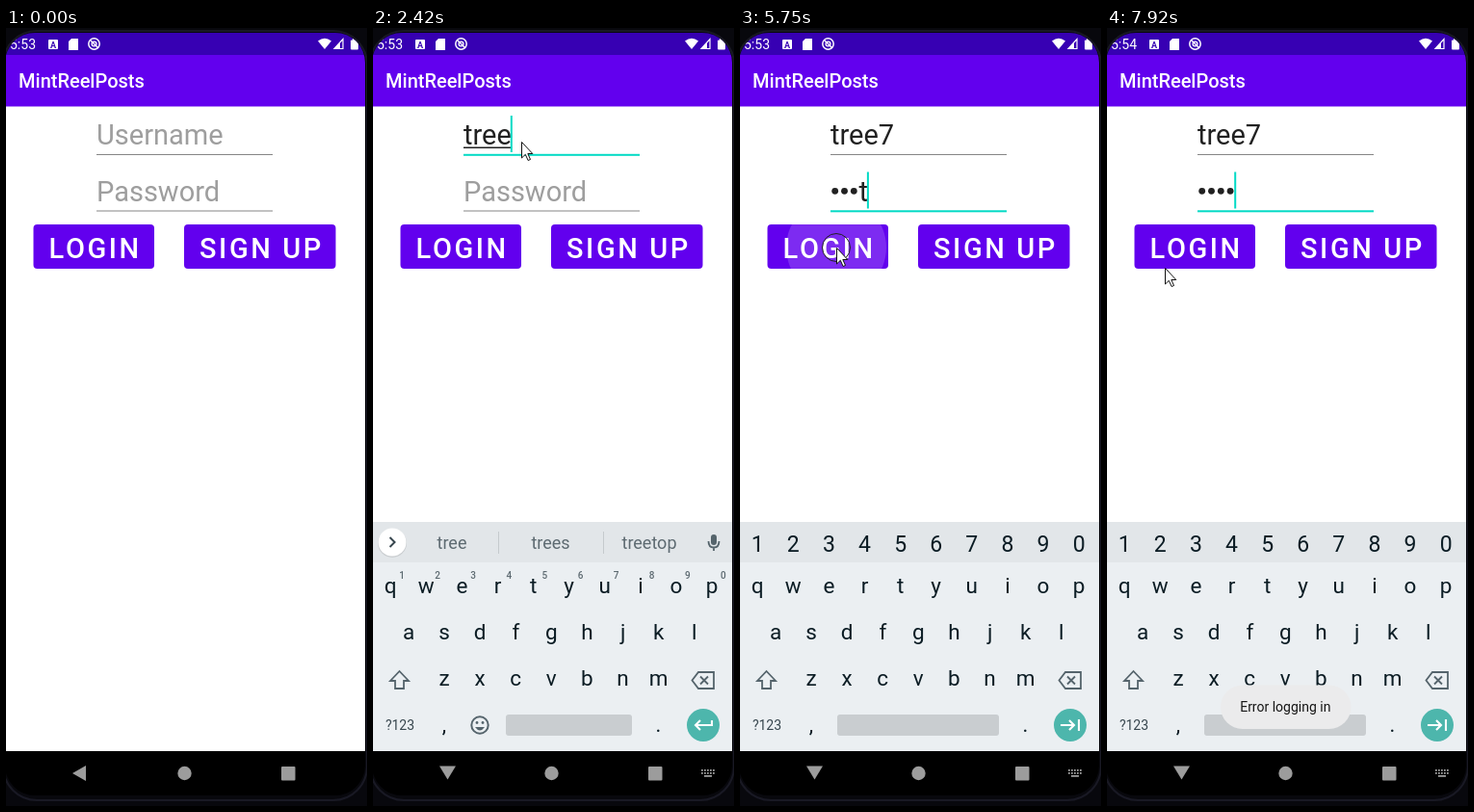
An HTML page that plays this animation: 375 by 808 pixels, repeating every 7.99 s.

```html
<!DOCTYPE html>
<html lang="en">
<head>
<meta charset="utf-8">
<title>Login screen</title>
<style>
  html, body { margin: 0; width: 100%; height: 100%; overflow: hidden; background: #08080d; }
  svg { display: block; width: 375px; height: 808px; font-family: Roboto, sans-serif; white-space: pre; }
</style>
</head>
<body>
<svg id="stage" viewBox="0 0 375 808"></svg>
<script>
const LOOP = 7990, PURPLE = '#6200ee', TEAL = '#03dac5', INK = '#0b1c24', ICON = '#55646c';
const stage = document.getElementById('stage');
const pen = document.createElement('canvas').getContext('2d');
pen.font = '29px Roboto, sans-serif';

const clamp = (v) => Math.max(0, Math.min(1, v));
const between = (t, a, b) => t >= a && t < b;
// Last value whose start time has passed; steps are [time, value].
const at = (steps, t) => steps.filter(([start]) => start <= t).pop()[1];

const rect = (x, y, w, h, fill, r = 0, extra = '') =>
  `<rect x="${x}" y="${y}" width="${w}" height="${h}" rx="${r}" fill="${fill}" ${extra}/>`;
const circle = (x, y, r, fill, extra = '') => `<circle cx="${x}" cy="${y}" r="${r}" fill="${fill}" ${extra}/>`;
const path = (d, fill, extra = '') => `<path d="${d}" fill="${fill}" ${extra}/>`;
const line = (d, color, width = 2) => path(d, 'none', `stroke="${color}" stroke-width="${width}"`);
const text = (s, x, y, size, fill, extra = '') =>
  `<text x="${x}" y="${y}" font-size="${size}" fill="${fill}" ${extra}>${s}</text>`;
const label = (s, x, y, size, fill, extra = '') => text(s, x, y, size, fill, 'text-anchor="middle" ' + extra);

const username = [[0, ''], [1950, 't'], [2080, 'tr'], [2280, 'tre'], [2350, 'tree'], [3220, 'tree7']];
const suggestions = [
  [0, null], [1950, ['the', 'to', 'this']], [2080, ['try', 'true', 'trip']],
  [2280, ['tree', 'trees', 'trend']], [2420, ['tree', 'trees', 'treetop']], [3220, ['tree7', 'tree', 'trees']],
];
const typedCount = [[0, 0], [4080, 1], [4210, 2], [4340, 3], [4560, 4]];
const caretOn = [
  [0, false], [1140, true], [2950, false], [3220, true], [5020, false], [5540, true],
  [6060, false], [6590, true], [7060, false], [7560, true],
];
const pointerPath = [
  [130, 316, 585], [270, 276, 440], [420, 205, 245], [540, 164, 140], [610, 154, 118],
  [5080, 154, 118], [5150, 167, 138], [5340, 167, 138], [5480, 130, 185], [5640, 100, 228],
  [6740, 100, 228], [6860, 93, 235], [7060, 93, 235], [7260, 90, 235], [7530, 90, 236],
  [7650, 91, 237], [7800, 91, 237], [7920, 60, 249], [LOOP, 60, 249],
];

function pointerAt(t) {
  const i = pointerPath.findIndex(([time]) => time > t);
  const [t0, x0, y0] = pointerPath[i - 1], [t1, x1, y1] = pointerPath[i];
  const p = (t - t0) / (t1 - t0);
  return [x0 + (x1 - x0) * p, y0 + (y1 - y0) * p];
}

function statusBar(t) {
  return rect(0, 5, 373, 23, '#3700b3') + rect(0, 28, 373, 53.5, PURPLE)
    + text(t < 7590 ? '5:53' : '5:54', 4, 21.5, 14, '#fff')
    + rect(44, 12, 10, 10, '#fff', 1) + label('A', 49, 20.5, 9, '#3700b3', 'font-weight="700"')
    + path('M68 11h7v12h-10v-9z', '#fff')
    + circle(91.5, 16.5, 5.7, 'none', 'stroke="#fff" stroke-width="1.5"')
    + circle(91.5, 16.5, 2.4, 'none', 'stroke="#fff" stroke-width="1.3"') + line('M88 13l8 8', '#fff', 1.4)
    + path('M324 13.5q7-5.5 14 0l-7 8.5z', '#fff')
    + line('M350 11.5v10h-9z', '#fff', 1.2) + path('M347 15v6.5h-6z', '#fff')
    + rect(358, 12.5, 8, 10, '#fff', 1) + rect(360, 11, 4, 2, '#fff')
    + text('MintReelPosts', 13, 62, 20, '#fff', 'font-weight="500"');
}

function field(y, hint, value, focused, caretX) {
  return (value || text(hint, 94, y, 29, '#9e9e9e'))
    + (focused ? rect(94, y + 9.8, 183, 2, TEAL) : rect(94, y + 10, 183, 1, '#858585'))
    + (caretX ? rect(caretX, y - 30, 2, 38, TEAL) : '');
}

function form(t) {
  const name = at(username, t), count = at(typedCount, t), caret = at(caretOn, t);
  const onName = between(t, 1140, 3610), onPassword = t >= 3610;
  const nameWidth = pen.measureText(name).width;
  let nameText = name && text(name, 94, 121, 29, '#212121');
  if (name && onName) nameText += rect(94, 123.5, nameWidth, 1.5, '#212121');

  const shown = t < 6060 && count ? 'plot'[count - 1] : '';
  const dots = count - (shown ? 1 : 0), shownX = 94 + 9.8 * dots;
  let secret = '';
  for (let i = 0; i < dots; i++) secret += circle(98.7 + 9.8 * i, 169.3, 3.4, '#212121');
  if (shown) secret += text(shown, shownX, 180, 29, '#212121');
  const secretEnd = Math.max(94, shownX + (shown ? pen.measureText(shown).width : 0) - 1);

  return field(121, 'Username', nameText, onName, onName && caret && 94 + nameWidth - (name ? 1 : 0))
    + field(179.5, 'Password', secret, onPassword, onPassword && caret && secretEnd);
}

function buttons(t) {
  const glow = between(t, 5650, 6450) ? 0.17 * clamp((6450 - t) / 600) : 0;
  const spaced = 'font-weight="500" letter-spacing="2.59"';
  return rect(28.5, 204, 125.5, 46, PURPLE, 4) + rect(185, 204, 157.5, 46, PURPLE, 4)
    + (glow ? `<g clip-path="url(#login)">${circle(100, 228, 20 + 95 * clamp((t - 5650) / 300), '#fff', `opacity="${glow}"`)}</g>` : '')
    + text('LOGIN', 44.5, 238.5, 29, '#fff', spaced) + text('SIGN UP', 201, 238.5, 29, '#fff', spaced);
}

function toolbar() {
  return circle(69, 532.5, 5, 'none', `stroke="${ICON}" stroke-width="2"`) + line('M72.5 536l5.5 5.5', ICON, 2.4)
    + line('M118 527h13v9l-5 5h-8z', ICON, 2) + circle(122, 531, 1.2, ICON) + circle(127, 531, 1.2, ICON)
    + line('M121 534.5q3.5 4 7 0', ICON, 1.6)
    + label('GIF', 178.5, 539, 14, ICON, 'font-weight="900" letter-spacing=".6"')
    + rect(226, 526, 16, 16, ICON, 2) + rect(267, 523, 1, 22, '#c9ced1')
    + [295, 301, 307].map((x) => circle(x, 534.5, 2, ICON)).join('');
}

function topStrip(t, numeric) {
  if (numeric) return keyRow('1234567890', 18.2, 543.5, 23);
  const words = at(suggestions, t);
  return circle(20, 535, 15, '#000', 'opacity=".1"') + circle(20, 534, 14.5, '#fff')
    + line(words ? 'M17.5 529l5 5l-5 5' : 'M22.5 529l-5 5l5 5', '#37464e', 2)
    + (words ? words.map((w, i) => label(w, 82 + 102.5 * i, 541, 18, '#5d6a71')).join('')
        + rect(130, 523, 1, 23, '#c5cacd') + rect(239, 523, 1, 23, '#c5cacd') : toolbar())
    + rect(351, 526, 6, 11, ICON, 3) + line('M348.5 533q0 6.5 5.5 6.5t5.5-6.5M354 539v4', ICON, 1.8);
}

const keyRow = (keys, x, y, size = 22.5) =>
  [...keys].map((k, i) => label(k, x + 37.1 * i, y, size, INK)).join('');

function keyboard(t) {
  if (t < 1200) return '';
  const numeric = t >= 3610, p = clamp((t - 1190) / 210);
  const hints = [...'1234567890'].map((d, i) => label(d, 30 + 37.1 * i, 572, 10, '#5d6a71', 'font-weight="500"')).join('');
  return `<g transform="translate(0 ${24 * (1 - p) ** 4})" opacity="${clamp(p * 2.25)}">`
    + rect(0, 513, 373, 238, '#ebeff2') + rect(0, 513, 373, 42, '#e2e6e9')
    + topStrip(t, numeric) + (numeric ? '' : hints)
    + keyRow('qwertyuiop', 18.2, 587) + keyRow('asdfghjkl', 37, 635) + keyRow('zxcvbnm', 74, 683)
    + line('M27.5 668l9.5 10h-5v8h-9v-8h-5z', ICON, 1.8)
    + line('M338 669h16v17h-16l-6.500-8.500z', ICON, 1.8) + line('M340 673.500l8 8m0-8l-8 8', ICON, 1.8)
    + label('?123', 28, 729, 14, '#37464e') + label(',', 74, 731, 22, INK) + label('.', 296.5, 731, 22, INK)
    + (numeric ? rect(101, 713, 168, 22, '#c9cdd0', 3)
      : rect(138, 713, 131, 22, '#c9cdd0', 3) + circle(111, 724, 8.7, 'none', `stroke="${ICON}" stroke-width="2"`)
        + circle(108, 721.500, 1.4, ICON) + circle(114, 721.500, 1.4, ICON) + path('M106 726h10q-5 7-10 0', ICON))
    + circle(343, 724, 17, '#4db6ac')
    + line(numeric ? 'M333 724h14m-5-5l5 5l-5 5M352 718v12' : 'M352 719v5h-17m5-5l-5 5l5 5', '#fff', 2.1)
    + '</g>';
}

function navBar(t) {
  const grey = '#9c9c9c';
  let keys = '';
  for (let i = 0; i < 10; i++) keys += rect(341 + (i % 5) * 3, 770 + (i > 4 ? 3 : 0), 1.8, 1.8, grey);
  return rect(0, 751, 373, 46, '#000')
    + path(t < 1200 ? 'M69 774l14-8v16z' : 'M69 766.500h17l-8.500 14z', grey)
    + circle(185.5, 774, 7.2, grey) + rect(286, 767, 14.5, 14.5, grey, 1)
    + (t >= 1140 ? keys + rect(344, 776, 8, 1.8, grey) : '');
}

function toast(t) {
  if (t < 6075) return '';
  return `<g opacity="${clamp((t - 6070) / 400)}">` + rect(118, 682.5, 135.5, 45.5, '#ebebec', 22.7)
    + label('Error logging in', 185.3, 710, 14, '#161616') + '</g>';
}

function pointer(t) {
  if (t < 130) return '';
  const [x, y] = pointerAt(t);
  const pressed = between(t, 810, 940) || between(t, 5650, 5780);
  return (pressed ? circle(x, y, 14.5, 'none', 'stroke="#222" stroke-width="1"') : '')
    + path('M.5 .5v16.500l3.800-3.700l2.800 6.200l2.400-1l-2.700-6h5z', '#fff',
      `stroke="#111" stroke-width="1" transform="translate(${x} ${y})"`);
}

const defs = `<defs><clipPath id="screen">${rect(-1, 5, 374, 792, '#000', 31)}</clipPath>`
  + `<clipPath id="login">${rect(28.5, 204, 125.5, 46, '#000', 4)}</clipPath></defs>`;

let drawn = '';
function render(t) {
  const picture = defs + rect(0, 0, 375, 808, '#08080d')
    + rect(-3, 3, 378, 799, 'none', 35, 'stroke="#191924" stroke-width="2"')
    + '<g clip-path="url(#screen)">' + rect(0, 81, 373, 670, '#fff')
    + statusBar(t) + form(t) + buttons(t) + navBar(t) + keyboard(t) + toast(t) + '</g>' + pointer(t);
  if (picture !== drawn) stage.innerHTML = drawn = picture;
}

const start = performance.now();
function tick() {
  render((performance.now() - start) % LOOP);
  requestAnimationFrame(tick);
}
tick();
</script>
</body>
</html>
```
